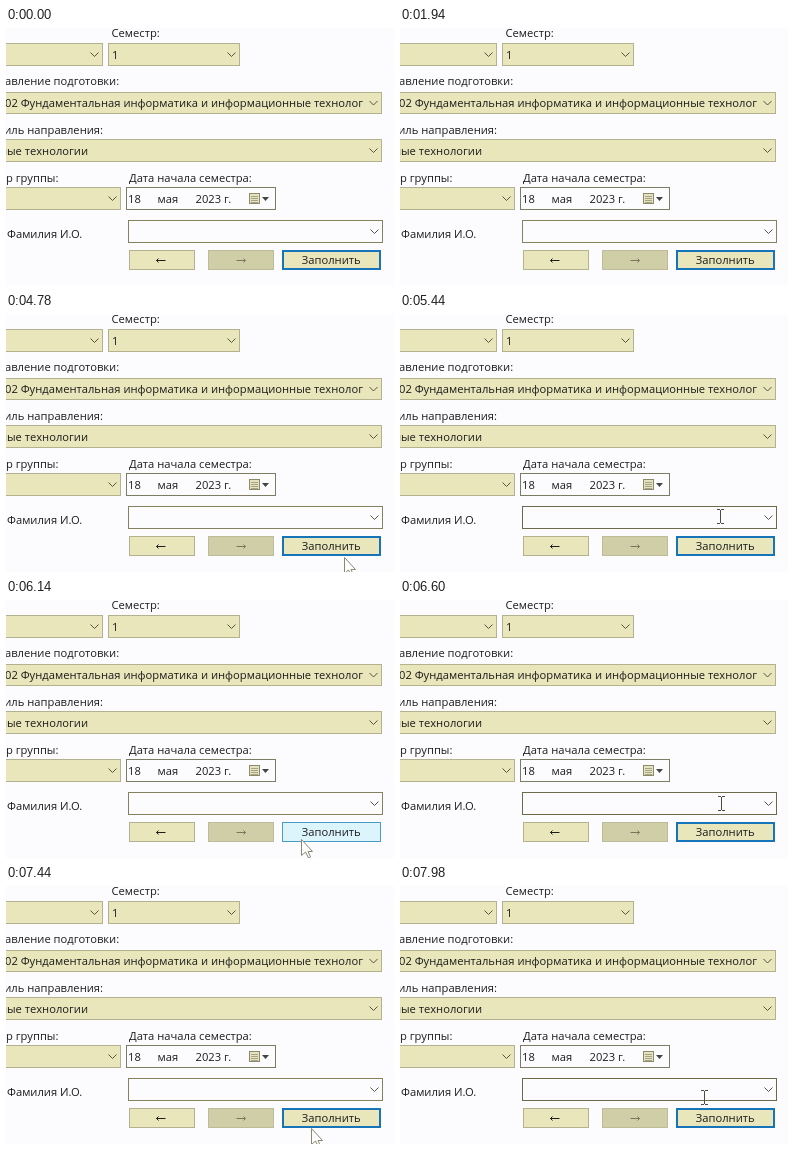
An HTML page with a canvas for the animation above (8 s loop, 388 by 258 pixels).

```html
<!DOCTYPE html>
<html lang="ru">
<meta charset="utf-8">
<style>
  html, body { margin: 0; height: 100%; overflow: hidden; background: #fcfcff; }
  canvas { display: block; }
</style>
<canvas id="stage" width="388" height="258"></canvas>
<script>
const ctx = document.getElementById('stage').getContext('2d');
const LOOP = 8000;
const PAPER = '#fcfcff', FILL = '#e8e6ba', EDGE = '#b4b28e', INK = '#1c1c1c';

// Pointer path: time, x, y of the hot spot
const path = [
  [4480, 394, 254], [4720, 350, 244], [4960, 308, 238], [5210, 298, 216],
  [5440, 320, 202], [5660, 342, 216], [5900, 326, 243], [6140, 295, 239],
  [6380, 297, 213], [6600, 321, 203], [6820, 343, 214], [7020, 339, 232],
  [7300, 317, 243], [7600, 295, 238], [7800, 295, 225], [7980, 304, 211], [8160, 322, 203]
];

function pointerAt(t) {
  if (t < path[0][0]) return null;
  const i = path.findIndex((p, k) => k && t < p[0]) - 1;
  const at = k => path[Math.max(0, Math.min(path.length - 1, k))];
  const [a, b, c, d] = [at(i - 1), at(i), at(i + 1), at(i + 2)];
  const u = (t - b[0]) / (c[0] - b[0]);
  const spline = n => b[n] + u / 2 * (c[n] - a[n]
    + u * (2 * a[n] - 5 * b[n] + 4 * c[n] - d[n]
    + u * (3 * (b[n] - c[n]) + d[n] - a[n])));
  return { x: Math.round(spline(1)), y: Math.round(spline(2)) };
}

const inside = (p, x, y, w, h) => p && p.x >= x && p.x < x + w && p.y >= y && p.y < y + h;
const overField = p => inside(p, 122, 192, 255, 23);
const overFillButton = p => inside(p, 276, 222, 99, 20);

function box(x, y, w, h, fill, edge, line = 1) {
  ctx.fillStyle = edge;
  ctx.fillRect(x, y, w, h);
  ctx.fillStyle = fill;
  ctx.fillRect(x + line, y + line, w - 2 * line, h - 2 * line);
}

function text(s, x, y, align = 'left') {
  ctx.font = '11.2px "Open Sans", "Noto Sans", sans-serif';
  ctx.textAlign = align;
  ctx.fillStyle = INK;
  ctx.fillText(s, x, y);
}

function shape(points, fill, stroke) {
  ctx.beginPath();
  points.forEach(([x, y]) => ctx.lineTo(x, y));
  if (fill) { ctx.closePath(); ctx.fillStyle = fill; ctx.fill(); }
  if (stroke) { ctx.strokeStyle = stroke; ctx.stroke(); }
}

function combo(x, y, w, h, fill = FILL, edge = EDGE) {
  box(x, y, w, h, fill, edge);
  const cx = x + w - 8.5, cy = y + h / 2;
  shape([[cx - 4, cy - 2], [cx, cy + 2], [cx + 4, cy - 2]], null, '#55553f');
}

function arrow(x, y, dir, color) {
  shape([[x - 4.5, y], [x + 4.5, y]], null, color);
  shape([[x + dir * 2.5, y - 2], [x + dir * 4.5, y], [x + dir * 2.5, y + 2]], null, color);
}

function calendar(x, y) {
  box(x, y, 11, 11, '#e4e2c0', '#8c8a68');
  ctx.fillStyle = '#a6a484';
  for (let row = 3; row < 10; row += 2) ctx.fillRect(x + 2, y + row, 7, 1);
  shape([[x + 13, y + 4], [x + 20, y + 4], [x + 16.5, y + 8]], '#444');
}

function drawPointer({ x, y }, beam) {
  if (beam) {
    ctx.fillStyle = '#4c4c40';
    ctx.fillRect(x, y - 6, 1, 13);
    for (const edge of [y - 7, y + 7]) {
      ctx.fillRect(x - 3, edge, 3, 1);
      ctx.fillRect(x + 1, edge, 3, 1);
    }
    return;
  }
  const outline = [[0, 0], [0, 16], [4, 12.5], [7, 18.5], [9, 17.5], [6.5, 12], [11, 12], [0, 0]];
  shape(outline.map(([px, py]) => [x + px + .5, y + py + .5]), '#fff', '#8a8870');
}

function draw(t) {
  const p = pointerAt(t);
  ctx.fillStyle = PAPER;
  ctx.fillRect(0, 0, 388, 258);

  text('Семестр:', 105.5, 9);
  combo(-20, 15, 117, 23);
  combo(102, 15, 132, 23);
  text('1', 106, 31);

  text('авление подготовки:', -1, 57);
  combo(-20, 64, 396, 22);
  text('02 Фундаментальная информатика и информационные технолог', 357, 79, 'right');

  text('Профиль направления:', 97, 106, 'right');
  combo(-20, 111, 396, 23);
  text('Информационные технологии', 82, 127, 'right');

  text('р группы:', 0, 154);
  combo(-20, 159, 135, 23);
  text('Дата начала семестра:', 123, 154);
  box(120, 159, 150, 23, PAPER, '#7c7c62');
  text('18', 122, 175);
  text('мая', 151.5, 175);
  text('2023 г.', 189.5, 175);
  calendar(243, 165);

  text('Фамилия И.О.', 1, 210);
  combo(122, 192, 255, 23, PAPER, overField(p) ? '#6c6a4a' : '#85835f');

  box(123, 222, 66, 20, FILL, EDGE);
  arrow(155, 232.5, -1, INK);
  box(202, 222, 66, 20, '#d0cea6', '#bdbb98');
  arrow(235, 232.5, 1, '#77775c');
  if (overFillButton(p)) box(276, 222, 99, 20, '#dcf4fb', '#4a9cc4');
  else box(276, 222, 99, 20, FILL, '#1874b8', 2);
  text('Заполнить', 325.2, 236, 'center');

  if (p) drawPointer(p, overField(p));
}

function tick() {
  draw(performance.now() % LOOP);
  requestAnimationFrame(tick);
}
tick();
</script>
</html>
```
